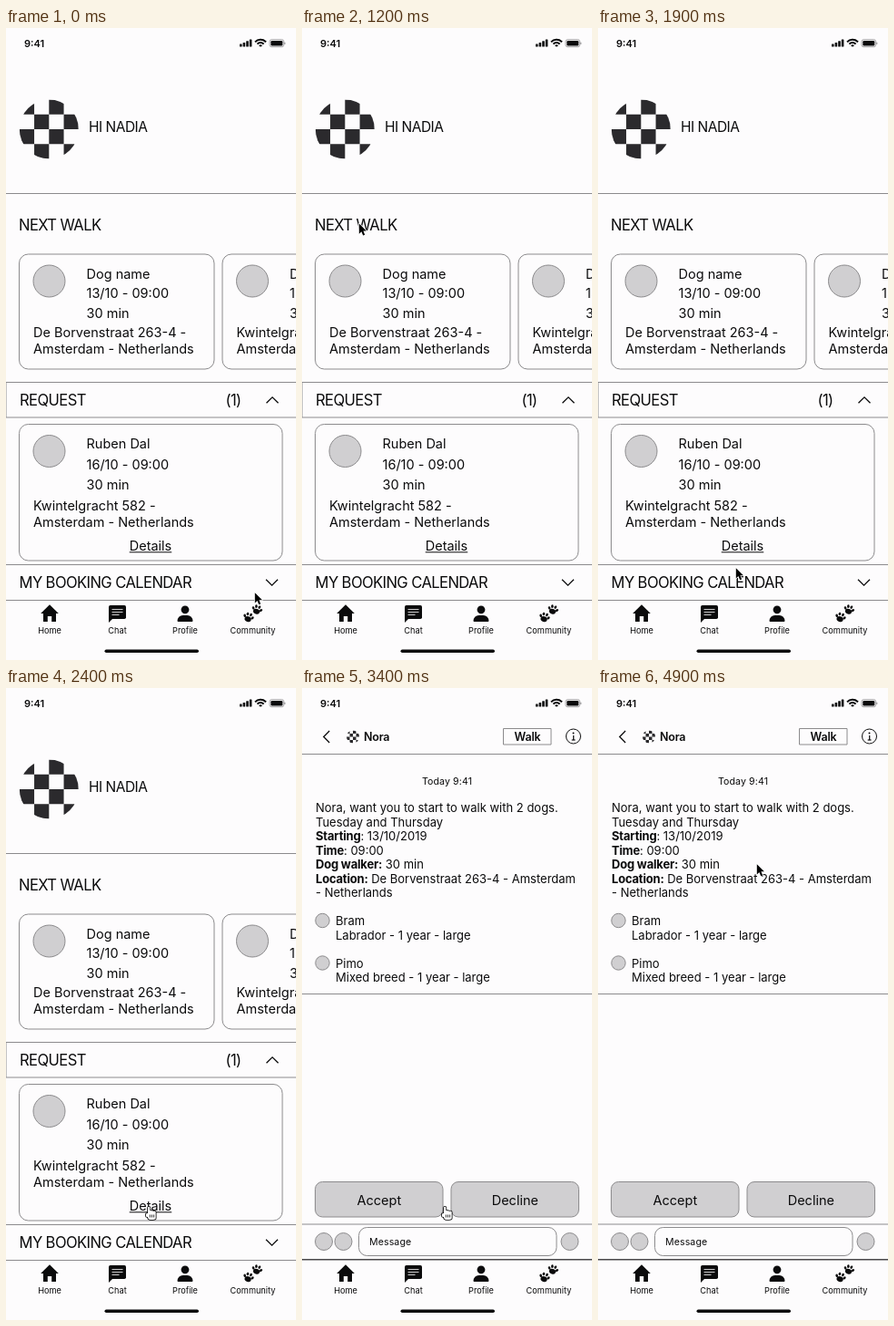
An HTML page with a canvas for the animation above (5000 ms loop, 319 by 693 pixels).

```html
<!DOCTYPE html>
<html lang="en">
<head>
<meta charset="utf-8">
<title>Dog walking app</title>
<style>
html, body { margin: 0; width: 100%; height: 100%; overflow: hidden; background: #fdfcfd; }
canvas { display: block; width: 319px; height: 693px; }
</style>
</head>
<body>
<canvas id="stage"></canvas>
<script>
const W = 319, H = 693, LOOP = 5000, STEP = 100;
const INK = '#0b0b0c', PAPER = '#fdfcfd', GREY = '#d0cfd1', EDGE = '#8c8b8d', DARK = '#2b2a2d';
const canvas = document.getElementById('stage');
const ctx = canvas.getContext('2d');
const ratio = window.devicePixelRatio || 1;
canvas.width = W * ratio;
canvas.height = H * ratio;

// Text styles: weight, size, tracking
const STYLE = {
  title: [400, 16.6, -0.6],
  hello: [400, 15.5, -0.5],
  body: [400, 14.5, 0],
  chat: [400, 13, 0],
  strong: [700, 13, -0.2],
  name: [600, 12.5, -0.2],
  small: [400, 10.6, 0.1],
  tab: [400, 9.2, 0],
  clock: [600, 11, 0]
};

function text(str, x, y, style, align = 'left') {
  const [weight, size, track] = STYLE[style];
  ctx.font = `${weight} ${size}px Inter, "Open Sans", sans-serif`;
  ctx.letterSpacing = track + 'px';
  ctx.textAlign = align;
  ctx.fillStyle = INK;
  ctx.fillText(str, x, y);
  return ctx.measureText(str).width;
}

function lines(rows, x, y, leading, style) {
  rows.forEach((row, i) => text(row, x, y + i * leading, style));
}

function paint(fill, stroke, width = 1) {
  if (fill) { ctx.fillStyle = fill; ctx.fill(); }
  if (stroke) { ctx.strokeStyle = stroke; ctx.lineWidth = width; ctx.stroke(); }
}

function box(x, y, w, h, r, fill, stroke, width) {
  ctx.beginPath();
  ctx.roundRect(x, y, w, h, r);
  paint(fill, stroke, width);
}

function disc(x, y, r, fill, stroke) {
  ctx.beginPath();
  ctx.arc(x, y, r, 0, Math.PI * 2);
  paint(fill, stroke);
}

function path(points, close) {
  ctx.beginPath();
  points.forEach(([x, y]) => ctx.lineTo(x, y));
  if (close) ctx.closePath();
}

function line(x1, y1, x2, y2, color = INK, width = 1) {
  path([[x1, y1], [x2, y2]]);
  paint(null, color, width);
}

function rule(y, color = EDGE, width = 1) {
  line(0, y, W, y, color, width);
}

function at(x, y, draw, angle = 0) {
  ctx.save();
  ctx.translate(x, y);
  ctx.rotate(angle);
  draw();
  ctx.restore();
}

function chevron(x, y, angle) {
  at(x, y, () => {
    path([[-6.5, 3.2], [0, -3.2], [6.5, 3.2]]);
    paint(null, INK, 1.3);
  }, angle);
}

function checker(cx, cy, r) {
  const cell = r / 2;
  at(cx, cy, () => {
    ctx.beginPath();
    ctx.arc(0, 0, r, 0, Math.PI * 2);
    ctx.clip();
    ctx.fillStyle = DARK;
    for (let row = 0; row < 4; row++)
      for (let col = row % 2; col < 4; col += 2)
        ctx.fillRect(col * cell - r, row * cell - r, cell, cell);
  });
}

function statusBar() {
  text('9:41', 20, 21, 'clock');
  for (let i = 0; i < 4; i++) {
    const h = 3 + i * 1.7;
    box(257 + i * 3.6, 20.6 - h, 2.6, h, 0.5, INK);
  }
  for (let r = 1.6; r < 9; r += 3.3) {
    ctx.beginPath();
    ctx.arc(280, 21, r, -Math.PI * 0.76, -Math.PI * 0.24);
    paint(null, INK, 2);
  }
  box(290, 12.7, 15.6, 8, 2.2, null, EDGE, 0.8);
  box(291.3, 14, 13, 5.4, 1.2, INK);
  box(306.3, 15.4, 1, 2.6, 0.5, EDGE);
}

function paw() {
  ctx.beginPath();
  ctx.ellipse(0, 2, 3.7, 2.9, 0, 0, Math.PI * 2);
  paint(INK);
  for (let a = -1.2; a < 1.3; a += 0.8)
    at(Math.sin(a) * 4.7, 1.2 - Math.cos(a) * 4.9, () => {
      ctx.beginPath();
      ctx.ellipse(0, 0, 1.3, 1.8, 0, 0, Math.PI * 2);
      paint(INK);
    }, a / 2);
}

const TABS = {
  Home() {
    path([[-9.8, 0], [0, -9.8], [9.8, 0]], true);
    paint(INK);
    box(-7, -1, 14, 10, 0.5, INK);
    box(-2.2, 3, 4.4, 6.2, 0, PAPER);
  },
  Chat() {
    box(-9.5, -9, 19, 15, 1.8, INK);
    path([[-9.5, 3], [-9.5, 10], [-5, 5.5]], true);
    paint(INK);
    for (let i = 0; i < 3; i++) line(-6, i * 3 - 4.5, i < 2 ? 6 : 2, i * 3 - 4.5, PAPER, 0.8);
  },
  Profile() {
    disc(0, -4.2, 4.4, INK);
    box(-8.5, 2, 17, 7, [6, 6, 1, 1], INK);
  },
  Community() {
    at(-4.8, 4.2, paw, 0.3);
    at(4.6, -4.2, paw, 0.3);
  }
};

function tabBar() {
  Object.entries(TABS).forEach(([label, icon], i) => {
    const x = 48 + i * 74.5;
    at(x, 642, icon);
    text(label, x, 664, 'tab', 'center');
  });
  box(108.5, 681.5, 103.5, 3.6, 1.8, INK);
}

function walkCard(x, y, w, h, leading, info, address) {
  box(x, y, w, h, 10, null, EDGE);
  disc(x + 33, y + 29.5, 17.5, GREY, EDGE);
  lines(info, x + 74, y + 26.5, leading, 'body');
  lines([address, 'Amsterdam - Netherlands'], x + 15.5, y + 26.5 + leading * 3, 17.8, 'body');
}

function homeScreen() {
  checker(47.3, 111, 32.5);
  text('HI NADIA', 91, 114, 'hello');
  rule(181.5);
  text('NEXT WALK', 14, 221.5, 'title');
  ['De Borvenstraat 263-4 -', 'Kwintelgracht 582 -'].forEach((address, i) =>
    walkCard(14.5 + i * 223.5, 248, 214.5, 126, 21.6, ['Dog name', '13/10 - 09:00', '30 min'], address));

  box(0, 388.5, W + 10, 38.5, 0, null, EDGE);
  text('REQUEST', 15, 414, 'title');
  text('(1)', 241.5, 413.5, 'title');
  chevron(293, 408, 0);
  walkCard(14.5, 434.5, 289.5, 149.5, 22.6, ['Ruben Dal', '16/10 - 09:00', '30 min'], 'Kwintelgracht 582 -');
  const half = text('Details', 159, 572.5, 'body', 'center') / 2;
  line(159 - half, 574.8, 159 + half, 574.8);

  rule(588.5);
  text('MY BOOKING CALENDAR', 14.5, 614, 'title');
  chevron(292.5, 608, Math.PI);
  rule(627.5);
}

function button(label, x) {
  box(x, 541.5, 140.5, 38.5, 8, GREY, EDGE);
  text(label, x + 70.3, 566.5, 'body', 'center');
}

// Bold key, then plain value
const MESSAGE = [
  ['', 'Nora, want you to start to walk with 2 dogs.'],
  ['', 'Tuesday and Thursday'],
  ['Starting', ': 13/10/2019'],
  ['Time', ': 09:00'],
  ['Dog walker:', ' 30 min'],
  ['Location:', ' De Borvenstraat 263-4 - Amsterdam'],
  ['', '- Netherlands']
];

function chatScreen() {
  chevron(27, 53.5, -Math.PI / 2);
  checker(56, 53.5, 7);
  text('Nora', 68, 58, 'name');
  box(221.5, 44.5, 52.5, 17.5, 0, null, EDGE);
  text('Walk', 248, 58, 'name', 'center');
  disc(298.5, 53, 8, null, INK);
  disc(298.5, 49.5, 1, INK);
  line(298.7, 52, 298.7, 57, INK, 1.2);
  line(296.7, 57, 300.5, 57, INK, 1.2);
  rule(72.5);

  text('Today 9:41', 159.5, 106, 'small', 'center');
  MESSAGE.forEach(([key, value], i) => {
    const y = 136 + i * 15.5;
    text(value, 15 + text(key, 15, y, 'strong'), y, 'chat');
  });
  [['Bram', 'Labrador - 1 year - large'], ['Pimo', 'Mixed breed - 1 year - large']].forEach((dog, i) => {
    const y = 255 + i * 46.5;
    disc(22.5, y, 7.7, GREY, EDGE);
    lines(dog, 37, y + 5, 15.5, 'chat');
  });
  rule(335.5);

  button('Accept', 14.5);
  button('Decline', 164);
  rule(588);
  [24, 45.5, 294.5].forEach(x => disc(x, 607, 9.5, GREY, EDGE));
  box(62.5, 591.5, 217.5, 31, 9, null, EDGE);
  text('Message', 74, 611, 'small');
  rule(626.7, '#4a494b', 1.4);
}

// Pointer flights: start and end time, bend point, landing point
const HOME = [273, 618];
const FLIGHTS = [
  [0, 200, [238, 574], [214, 541]],
  [300, 900, [253, 577], [93, 292]],
  [900, 1500, [11, 116], [133, 329]],
  [1500, 1700, [100, 480], [128, 659]],
  [1700, 2100, [162, 570], [152, 565]],
  [2100, 2400, [153, 568], [153, 568]],
  [2700, 3000, [152, 562], [153, 568]],
  [4200, 4800, [190, 330], [65, 166]],
  [4800, 4900, [120, 170], [174, 192]]
];

function pointerAt(t) {
  let from = HOME;
  for (const [start, end, bend, to] of FLIGHTS) {
    if (t < start) break;
    if (t < end) {
      const u = (t - start) / (end - start);
      const e = u * u * (3 - 2 * u);
      return from.map((p, i) => (1 - e) ** 2 * p + 2 * e * (1 - e) * bend[i] + e * e * to[i]);
    }
    from = to;
  }
  return from;
}

function arrow() {
  ctx.translate(0.8, 1.2);
  ctx.scale(0.92, 0.92);
  path([[0, 0], [0, 12.2], [2.8, 9.6], [4.8, 14.2], [6.9, 13.3], [5, 8.8], [8.8, 8.8]], true);
  ctx.lineJoin = 'round';
  paint(null, '#fff', 1.4);
  paint('#000');
}

function hand() {
  const shape = new Path2D();
  for (let i = 0; i < 4; i++) shape.roundRect(3 + i * 2.1, i ? 4.4 + i * 0.4 : 0.8, 2.4, 9, 1.2);
  shape.roundRect(3, 8, 8.7, 7, [0, 0, 3, 3]);
  shape.roundRect(0.8, 8, 3.6, 4, 1.6);
  ctx.strokeStyle = '#000';
  ctx.lineWidth = 1.6;
  ctx.stroke(shape);
  ctx.fillStyle = '#fff';
  ctx.fill(shape);
  for (let x = 5.4; x < 10; x += 2.1) line(x, 9.5, x, 12.5, '#000', 0.8);
}

const start = performance.now();

function draw() {
  const now = Math.max(0, performance.now() - start) % LOOP;
  const t = Math.floor(now / STEP) * STEP;
  ctx.setTransform(ratio, 0, 0, ratio, 0, 0);
  ctx.fillStyle = PAPER;
  ctx.fillRect(0, 0, W, H);
  statusBar();
  if (t < 3400) homeScreen();
  else chatScreen();
  tabBar();
  const [x, y] = pointerAt(t);
  at(x, y, t >= 2100 && t < 4300 ? hand : arrow);
  requestAnimationFrame(draw);
}
draw();
</script>
</body>
</html>
```
